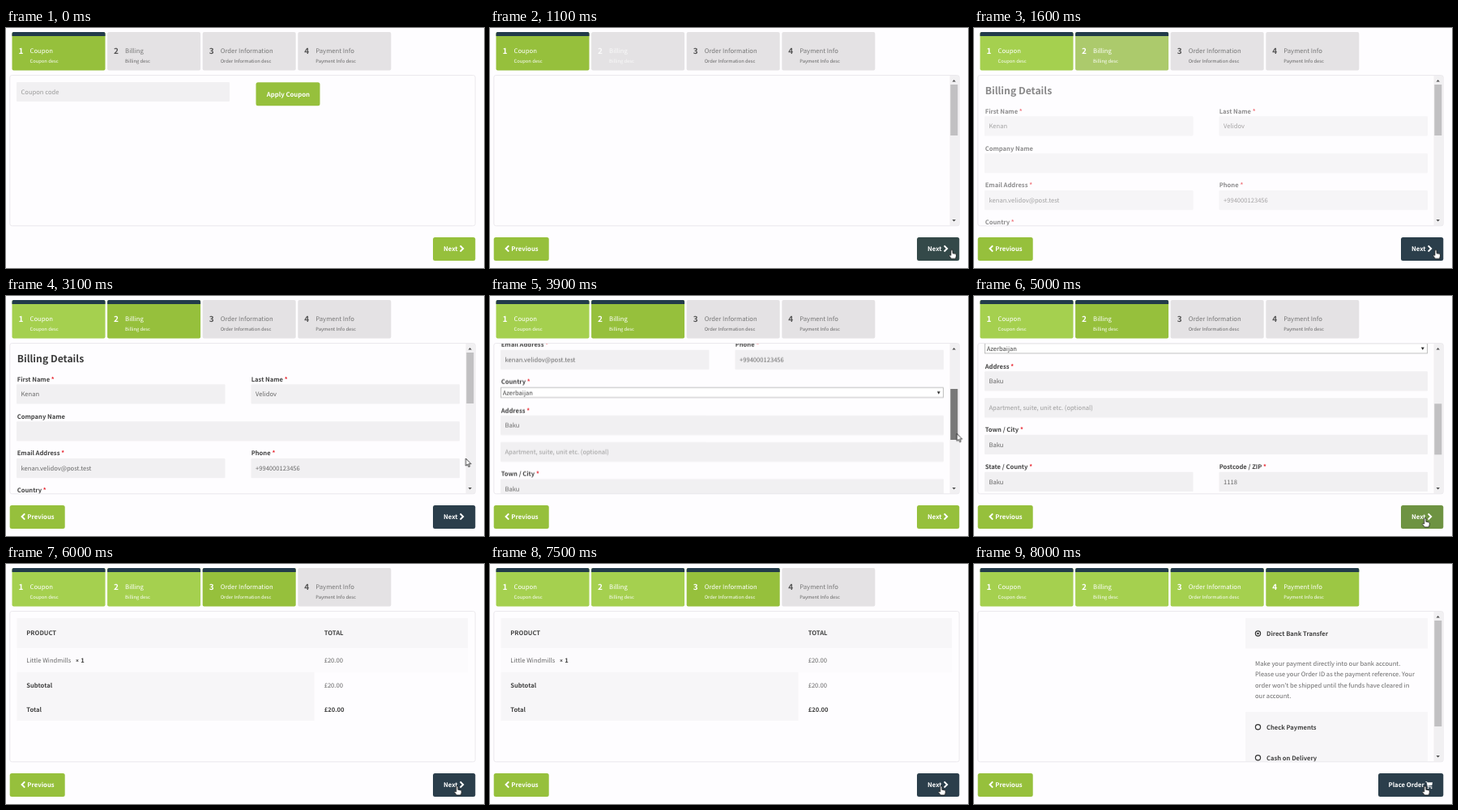
An HTML page that plays this animation: 590 by 297 pixels, repeating every 8.1 s.

```html
<!DOCTYPE html>
<html lang="en">
<head>
<meta charset="utf-8">
<title>Checkout steps</title>
<style>
  html, body { margin: 0; width: 100%; height: 100%; overflow: hidden; background: #fefdff; }
  svg { display: block; width: 590px; height: 297px; }
  text {
    font: 7.6px "Noto Sans CJK JP", "Noto Sans CJK SC", "Noto Sans", sans-serif;
    text-rendering: geometricPrecision; white-space: pre; fill: #686868;
  }
  .bold { font-weight: 700; fill: #424242; }
  .heading { font-size: 12.2px; font-weight: 700; fill: #3c3c3c; }
  .hint { fill: #9b9b9b; }
  .button { font-size: 7.75px; font-weight: 700; fill: #fff; }
  .number { font-size: 10px; font-weight: 700; fill: #555; }
  .title { font-size: 7.7px; fill: #777; }
  .desc { font-size: 5.8px; fill: #666; }
  .times { font-family: "Open Sans", sans-serif; font-size: 7px; }
  .required { fill: #e8202a; }
  .icon { fill: none; stroke: #fff; stroke-width: 2; }
  .radio { fill: none; stroke: #333; stroke-width: 1.2; }
  .cursor { fill: #fff; stroke: #111; stroke-width: .8; stroke-linejoin: round; }
</style>
</head>
<body>
<script>
const LOOP = 8100, TICK = 100;
const GREEN = "#96c03c", DONE = "#a5d04f", GREY = "#e4e2e4", DARK = "#2b3e4b", FIELD = "#f1f0f2", CELL = "#f7f6f8";

// Drawing helpers
const text = (x, y, str, cls = "") => `<text x="${x}" y="${y}" class="${cls}">${str}</text>`;
const rect = (x, y, w, h, fill, more = "") =>
  `<rect x="${x}" y="${y}" width="${w}" height="${h}" fill="${fill}" ${more}/>`;
const group = (id, ...parts) => `<g id="${id}">${parts.join("")}</g>`;
const button = (x, y, w, id = "") => rect(x, y, w, 29, GREEN, `rx="2.5" id="${id}"`);
const icon = d => `<path class="icon" d="${d}"/>`;
const label = (x, y, str, required = true) =>
  text(x, y, str + (required ? ' <tspan class="required">*</tspan>' : ""), "bold");
const input = (x, y, w, value, cls) => rect(x, y, w, 24.3, FIELD, 'rx="1"') + text(x + 5.5, y + 15, value, cls);
const radio = (y, name) => `<circle class="radio" cx="350.5" cy="${y}" r="3.1"/>` + text(361, y + 2.8, name, "bold");

// Animation helpers: each segment advances in whole ticks
let css = "";
function track(id, prop, points) {
  const all = [...points, [LOOP, points.at(-1)[1]]].filter((p, i, a) => !i || p[0] > a[i - 1][0]);
  const frames = all.map(([t, v], i) => {
    const n = i + 1 < all.length ? Math.max(1, Math.round((all[i + 1][0] - t) / TICK)) : 1;
    return `${(t / LOOP * 100).toFixed(4)}%{${prop}:${v};animation-timing-function:steps(${n})}`;
  });
  css += `@keyframes ${id}-${prop}{${frames.join("")}}
    #${id}{animation:${id}-${prop} ${LOOP}ms -10ms infinite}`;
}
const show = (id, on, off = LOOP) =>
  track(id, "opacity", [[0, 0], [on - TICK, 0], [on, 1], [off - TICK, 1], [off, 0]]);
const move = (id, points) =>
  track(id, "transform", points.map(([t, x, y]) => [t, `translate(${x}px,${y}px)`]));

// Step tabs
const steps = ["Coupon", "Billing", "Order Information", "Payment Info"];
const tabs = steps.map((name, i) => {
  const x = 7.5 + i * 117.6;
  return rect(x, 5, 115, 47.6, i ? GREY : GREEN, `rx="2" id="tab${i}"`) +
    `<path id="bar${i}" d="M${x} 10V7q0-2 2-2h111q2 0 2 2v3z" fill="#223b4a"/>` +
    text(x + 8, 32, i + 1, `number" id="number${i}`) +
    text(x + 22, 31.4, name, `title" id="title${i}`) +
    text(x + 22, 42.8, name + " desc", `desc" id="desc${i}`);
}).join("");

const coupon = group("coupon",
  rect(13, 67, 263, 24, FIELD, 'rx="1"'), text(18.5, 81.5, "Coupon code", "hint"),
  button(308.5, 67.3, 79), text(321.8, 84.5, "Apply Coupon", "button"));

const billing = group("billing", group("form",
  text(13.7, 82, "Billing Details", "heading"),
  label(13.7, 105.6, "First Name"), input(13, 109.3, 257.5, "Kenan"),
  label(302.7, 105.6, "Last Name"), input(302.5, 109.3, 257.5, "Velidov"),
  label(13.7, 151.6, "Company Name", false), input(13, 155.2, 547, ""),
  label(13.7, 197.4, "Email Address"), input(13, 201, 257.5, "kenan.velidov@post.test"),
  label(302.7, 197.4, "Phone"), input(302.5, 201, 257.5, "+994000123456"),
  label(13.7, 243.2, "Country"),
  rect(13.5, 247.7, 546, 12.2, "#fff", 'stroke="#b0b0b0" stroke-width=".8"'),
  text(15.7, 256.8, "Azerbaijan", "bold\" style=\"font-weight:400"),
  '<path d="M551.8 252.5h4l-2 3.2z" fill="#222"/>',
  label(13.7, 278.8, "Address"), input(13, 282.2, 547, "Baku"),
  input(13, 315.2, 547, "Apartment, suite, unit etc. (optional)", "hint"),
  label(13.7, 357.2, "Town / City"), input(13, 360.8, 547, "Baku"),
  label(13.7, 403.2, "State / County"), input(13, 406.8, 257.5, "Baku"),
  label(302.7, 403.2, "Postcode / ZIP"), input(302.5, 406.8, 257.5, "1118")));

const order = group("order",
  rect(13.5, 67, 556.5, 37, CELL), rect(13.5, 104, 556.5, 30, "#fcfbfd"), rect(13.5, 134, 367, 60, CELL),
  text(25.3, 88.2, "PRODUCT", "bold"), text(392.7, 88.2, "TOTAL", "bold"),
  text(25.3, 121.8, "Little Windmills"), text(86, 121.6, "×", "bold times"), text(92.3, 121.8, "1", "bold"),
  text(392.7, 121.8, "£20.00"),
  text(25.3, 152.5, "Subtotal", "bold"), text(392.7, 152.5, "£20.00"),
  text(25.3, 183, "Total", "bold"), text(392.7, 183, "£20.00", "bold"));

const note = ["Make your payment directly into our bank account.",
  "Please use your Order ID as the payment reference. Your",
  "order won't be shipped until the funds have cleared in", "our account."];
const payment = group("payment",
  rect(335, 67, 225, 37.5, CELL), rect(335, 183, 225, 62, CELL),
  radio(86, "Direct Bank Transfer"), '<circle cx="350.5" cy="86" r="1.3" fill="#333"/>',
  ...note.map((line, i) => text(347, 125.8 + i * 13.35, line)),
  radio(201.7, "Check Payments"), radio(239.7, "Cash on Delivery"));

const scrollbar = (id, thumbHeight) => group(id,
  rect(567.5, 59, 11.2, 185.5, "#f1f0f2"),
  '<path d="M570.5 66.5h4.4l-2.2-2.6zM570.5 237h4.4l-2.2 2.6z" fill="#505050"/>',
  group(id + "Thumb", rect(568.3, 70, 9, thumbHeight, "#c1c0c2", `id="${id}Fill"`)));

const footer = group("previous", button(4.7, 259, 68),
    icon("M23.2 269.4 19.6 273l3.6 3.6"), text(26.3, 275.8, "Previous", "button")) +
  group("next", button(527, 259, 52.3, "nextFill"),
    text(540, 275.8, "Next", "button"), icon("M560.6 269.4l3.6 3.6-3.6 3.6")) +
  group("place", rect(499, 259, 80.3, 29, DARK, 'rx="2.5"'),
    text(511.5, 275.8, "Place Order", "button"),
    '<path d="M557.4 269.2h1.8l.4 1h6.4l-.7 3.7-4.7.6.2.8h4.6v.9h-5.4l-1.4-6.1h-1.2z" fill="#fff"/>' +
    '<circle cx="560.6" cy="277.3" r=".9" fill="#fff"/><circle cx="564.6" cy="277.3" r=".9" fill="#fff"/>');

const cursors = group("arrow", group("arrowAt",
    '<path class="cursor" d="M0 0V9.2L2.1 7.3 3.6 10.5 5 9.9 3.6 6.8H6.5z"/>')) +
  group("hand", group("handAt",
    '<path class="cursor" d="M-1.1 6V1a1.1 1.1 0 0 1 2.2 0V4.2L4.6 5Q5.8 5.4 5.6 7.4L4.6 11H-.6L-3.3 7.4Q-3.2 5.6-1.1 7z"/>'));

document.body.innerHTML = `<svg viewBox="0 0 590 297">
  <clipPath id="view"><rect x="5" y="59" width="574" height="185.5"/></clipPath>
  ${tabs}
  <g clip-path="url(#view)">${coupon}${billing}${order}${payment}
    ${scrollbar("formBar", 63)}${scrollbar("payBar", 131)}</g>
  <rect x="4.8" y="58.5" width="574.4" height="186.3" rx="2.5" fill="none" stroke="#e9e7eb" stroke-width=".9"/>
  ${footer}${cursors}</svg>`;

// Tabs: text turns white first, then the background fills
function activate(i, start, end, final = GREEN) {
  for (const [part, color] of [["number", "#555"], ["title", "#777"], ["desc", "#666"]])
    track(part + i, "fill", [[0, color], [start - TICK, color], [start, "#fafafa"], [start + TICK, "#fff"]]);
  show("bar" + i, start + 2 * TICK);
  return [[0, GREY], [start, GREY], [end, final]];
}
css += "#number0,#title0,#desc0{fill:#fff}";
track("tab0", "fill", [[0, GREEN], [1200, GREEN], [1500, DONE]]);
track("tab1", "fill", [...activate(1, 1100, 1800), [5300, GREEN], [5700, DONE]]);
track("tab2", "fill", [...activate(2, 5300, 6000), [7600, GREEN], [8000, DONE]]);
track("tab3", "fill", activate(3, 7600, 8000, "#9cc744"));

// Panel pages
track("coupon", "opacity", [[0, 1], [700, 1], [1000, 0]]);
track("billing", "opacity", [[0, 0], [1300, 0], [1800, 1], [5100, 1], [5400, 0]]);
track("order", "opacity", [[0, 0], [5500, 0], [6000, 1], [7500, 1], [7700, 0]]);
track("payment", "opacity", [[0, 0], [7700, 0], [8000, 1]]);
const scroll = [[0, 0], [3300, 0], [3900, 45], [4000, 45], [4300, 63.3]];
move("formBarThumb", scroll.map(([t, y]) => [t, 0, y]));
move("form", scroll.map(([t, y]) => [t, 0, -2.985 * y]));
track("formBarFill", "fill", [[0, "#c1c0c2"], [3200, "#c1c0c2"], [3300, "#787878"], [4300, "#787878"], [4400, "#c1c0c2"]]);
show("formBar", 1000, 5400);
show("payBar", 7700);

// Buttons
show("previous", 1000);
track("next", "opacity", [[0, 1], [7600, 1], [7700, 0]]);
show("place", 7700);
track("nextFill", "fill", [[0, GREEN], [700, GREEN], [1100, "#344949"], [1200, DARK],
  [3100, DARK], [3500, GREEN], [4800, GREEN], [5000, "#6e9342"], [5300, DARK]]);

// Pointer
track("hand", "opacity", [[0, 0], [700, 0], [800, 1], [3000, 1], [3100, 0], [4600, 0], [4700, 1]]);
show("arrow", 3100, 4700);
move("handAt", [[0, 570, 274.5], [4500, 570, 274.5], [4600, 562, 262], [4800, 556.7, 275]]);
move("arrowAt", [[0, 567.5, 201], [3100, 567.5, 201], [3300, 574, 125], [3900, 576.3, 170.3],
  [4000, 576.3, 170.3], [4300, 577, 188.6], [4700, 562, 268]]);

document.head.appendChild(document.createElement("style")).textContent = css;
</script>
</body>
</html>
```
